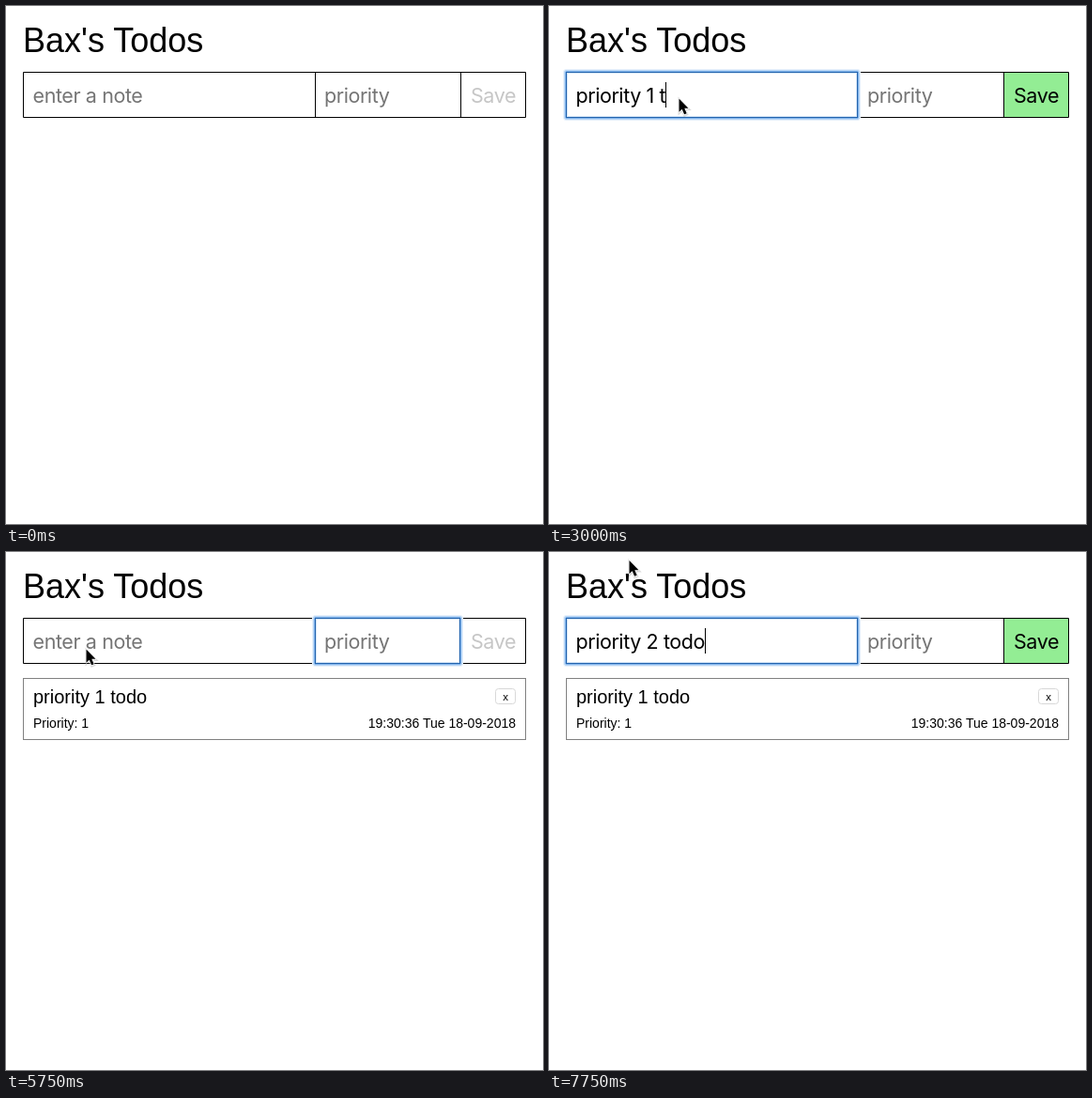
An HTML page for the animation above (8000 ms loop, 572 by 551 pixels).

```html
<!DOCTYPE html>
<html lang="en">
<head>
<meta charset="utf-8">
<title>Todos</title>
<style>
  html, body { margin: 0; width: 100%; height: 100%; overflow: hidden; background: #fff; }
  svg { display: block; width: 572px; height: 551px; font-family: "Liberation Sans", Arial, sans-serif; }
  text { white-space: pre; }
  .field { font: 21.5px Inter, Roboto, sans-serif; letter-spacing: -0.4px; }
  .line { fill: none; stroke: #000; }
  .small { font-size: 14px; }
</style>
</head>
<body>
<svg viewBox="0 0 572 551">
  <text x="18" y="49" font-size="36">Bax's Todos</text>

  <rect id="button" x="485" y="71" width="68" height="47" fill="#93ed94"/>
  <path class="line" d="M18.5 70.5H553.5V118.5H18.5ZM329.5 70V119M484.5 70V119"/>
  <g id="ring" fill="none"></g>
  <text id="note" class="field" x="28.5" y="103"></text>
  <text id="prio" class="field" x="339" y="103"></text>
  <text id="save" class="field" x="519" y="103" text-anchor="middle">Save</text>
  <rect id="caret" y="81" width="1" height="27"/>

  <g id="card">
    <rect x="18.5" y="134.5" width="535" height="65" fill="none" stroke="#808080"/>
    <text x="29" y="161" font-size="20">priority 1 todo</text>
    <text class="small" x="29" y="187">Priority: 1</text>
    <text class="small" x="543" y="187" text-anchor="end">19:30:36 Tue 18-09-2018</text>
    <rect x="521.5" y="145.5" width="21" height="16" rx="3" fill="#fff" stroke="#d8d8d8"/>
    <text x="532" y="158" font-size="11.5" text-anchor="middle">x</text>
  </g>

  <g id="cursor">
    <path d="M0 0V14.2L3.2 11.2L5.6 16.8L8.2 15.7L5.8 10.3H10Z" transform="translate(.3 1)"
      fill="none" stroke="#000" stroke-opacity=".15" stroke-width="2.5"/>
    <path d="M0 0V14.2L3.2 11.2L5.6 16.8L8.2 15.7L5.8 10.3H10Z" stroke="#fff" stroke-width="1.6"
      stroke-linejoin="round" paint-order="stroke"/>
  </g>
</svg>
<script>
const LOOP = 8000, STEP = 250;
const $ = id => document.getElementById(id);

// Focusable boxes: left edge, width, gap between the last letter and the caret
const boxes = {
  note: { x: 18, w: 311, gap: 0 },
  prio: { x: 329, w: 155, gap: 2 }
};

// Every entry keeps the earlier values and changes the listed ones
const events = [
  [0, { note: "", prio: "", focus: "", caret: false, at: null, card: false }],
  [250, { at: [152, 67] }],
  [500, { at: [140, 116] }],
  [750, { at: [138.5, 98.5] }],
  [1000, { focus: "note", caret: true }],
  [1250, { caret: false }],
  [1750, { note: "pr", caret: true }],
  [2000, { note: "prio" }],
  [2250, { note: "priori" }],
  [2500, { note: "priority" }],
  [2750, { note: "priority 1 " }],
  [3000, { note: "priority 1 t" }],
  [3250, { note: "priority 1 to" }],
  [3500, { note: "priority 1 todo" }],
  [3750, { caret: false }],
  [4000, { caret: true }],
  [4250, { focus: "prio" }],
  [4750, { prio: "1" }],
  [5000, { note: "", prio: "", card: true }],
  [5500, { caret: false, at: [104, 119] }],
  [5750, { at: [85.5, 103.5] }],
  [6000, { focus: "note", caret: true, at: [85.5, 50] }],
  [6250, { note: "pr", at: [85.5, 9] }],
  [6500, { note: "prio" }],
  [6750, { note: "priori" }],
  [7000, { note: "priority" }],
  [7250, { note: "priority 2" }],
  [7500, { note: "priority 2 to" }],
  [7750, { note: "priority 2 todo" }]
];

function stateAt(t) {
  return Object.assign({}, ...events.filter(e => e[0] <= t).map(e => e[1]));
}

function show(id, on) {
  $(id).setAttribute("display", on ? "inline" : "none");
}

function fillField(id, value, hint) {
  $(id).textContent = value || hint;
  $(id).setAttribute("fill", value ? "#000" : "#757575");
}

function ringMarkup({ x, w }) {
  const layers = [[2.5, "#e6f0fb"], [1.5, "#b9d6f5"], [0.5, "#83b5ec"], [-0.5, "#2464ad"], [-1.5, "#d5e6f8"]];
  return layers.map(([d, color]) =>
    `<rect x="${x - d}" y="${70 - d}" width="${w + 2 * d}" height="${49 + 2 * d}" rx="${Math.max(d, 0)}" stroke="${color}"/>`
  ).join("");
}

function placeCaret(s) {
  const label = $(s.focus);
  const length = s[s.focus] ? label.getComputedTextLength() + boxes[s.focus].gap : 0;
  $("caret").setAttribute("x", Math.round(+label.getAttribute("x") + length));
}

function draw(t) {
  const s = stateAt(t);
  fillField("note", s.note, "enter a note");
  fillField("prio", s.prio, "priority");
  show("button", s.note);
  $("save").setAttribute("fill", s.note ? "#000" : "#c6c6c6");
  $("ring").innerHTML = s.focus ? ringMarkup(boxes[s.focus]) : "";
  show("caret", s.focus && s.caret);
  if (s.focus) placeCaret(s);
  show("card", s.card);
  show("cursor", s.at);
  if (s.at) $("cursor").setAttribute("transform", `translate(${s.at})`);
}

let last = -1;
function tick() {
  const t = Math.floor(performance.now() % LOOP / STEP) * STEP;
  if (t !== last) draw(last = t);
  requestAnimationFrame(tick);
}
draw(0);
tick();
</script>
</body>
</html>
```
